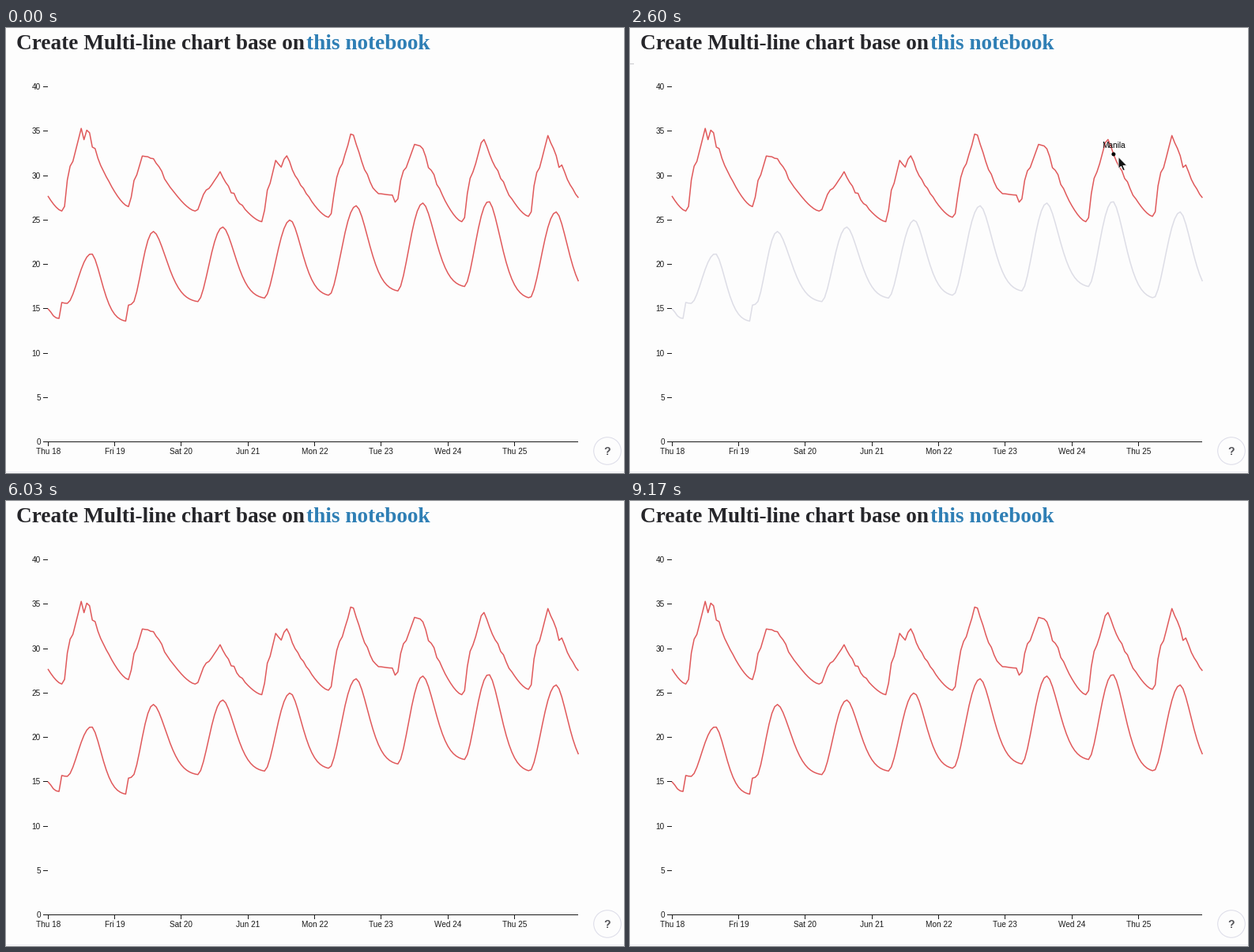
These frames come from a looping animation (782 px wide and 564 px high, 9.21 s). A matplotlib script:

```python
import numpy as np
import matplotlib.pyplot as plt
from matplotlib import patheffects
from matplotlib.animation import FuncAnimation
from matplotlib.patches import Circle, Polygon

W, H, DPI = 782, 564, 64
PT = 72 / DPI
FRAMES, STEP = 307, 30
LAG = 120  # ms the marker trails the pointer

PAPER, INK, LINK = "#fdfdfd", "#26262a", "#2f7fb5"
LINE, FADED, TEXT = "#e0585a", "#dddde6", "#1a1a1a"

# (hour, temperature) at the daily turns
MANILA = [(0, 27.7), (5, 26), (12, 35.3), (13, 34), (14, 35.3), (29, 26.5),
          (34, 32.2), (38, 32), (53, 26), (62, 30.3), (77, 24.8), (82, 31.7),
          (84, 31), (86, 32.3), (101, 25.3), (109.5, 35.1), (119, 28),
          (124, 27.8), (125, 27), (132, 33.5), (135, 33.2), (149, 24.8),
          (156.6, 34.4), (173, 25.4), (180, 34.5), (196, 26)]
ONTARIO = [(0, 15), (4, 13.9), (5, 15.7), (7, 15.6), (15.7, 21.2), (28, 13.6),
           (29, 15.4), (30.3, 15.5), (38, 23.7), (54, 15.8), (63, 24.2),
           (78, 16.2), (87.3, 25), (101.3, 16.5), (111, 26.6), (126, 17),
           (135, 26.9), (150, 17.5), (158.7, 27.1), (173.5, 16.2), (183, 25.9),
           (197, 16.3)]
# pointer visits: (ms, x, y) where the hand slows down
VISITS = [
    [(1250, 786, 90), (1700, 677, 181), (1830, 675, 177), (2500, 620, 160),
     (3110, 574, 241), (3230, 568, 225), (3800, 515, 175), (4350, 488, 209),
     (4470, 486, 187), (5800, 786, 180)],
    [(6400, 786, 190), (6900, 640, 280), (7850, 502, 316), (7970, 501, 318),
     (8800, 0, 300)],
]


def ease(s):
    return (1 - np.cos(np.pi * s)) / 2


def morning(s):
    """Quick jump after sunrise, short rest, then a climb to noon."""
    return np.interp(s, [0, .14, .28, .42, .57, 1], [0, .05, .37, .54, .6, 1])


def evening(s):
    return 1 - (1 - s) ** 1.5


def swell(s):
    return ease(s ** .86)


def ebb(s):
    return (1 - np.exp(-(s / .432) ** 1.72)) / .985


def trace(x, knots, rise, fall):
    """Join the knots with one shape for rising and one for falling spans."""
    kx, ky = np.array(knots, float).T
    x = np.clip(x, kx[0], kx[-1])
    i = np.clip(np.searchsorted(kx, x, side="right") - 1, 0, len(kx) - 2)
    s = (x - kx[i]) / (kx[i + 1] - kx[i])
    dy = ky[i + 1] - ky[i]
    return ky[i] + dy * np.where(dy > 0, rise(s), fall(s))


def px(hour):
    return 53 + hour * 3.515


def py(temp):
    return 524.5 - temp * 11.25


hours = np.arange(192)
gusts = np.random.default_rng(4).normal(0, .22, 192)
gusts *= np.exp(-((hours % 24 - 17) / 4) ** 2)
upper = trace(hours, MANILA, morning, evening) + gusts
lower = trace(hours, ONTARIO, swell, ebb)
SERIES = {"Manila": np.column_stack([px(hours), py(upper)]),
          "Ontario": np.column_stack([px(hours), py(lower)])}

fig = plt.figure(figsize=(W / DPI, H / DPI), dpi=DPI, facecolor=PAPER)
ax = fig.add_axes([0, 0, 1, 1])
ax.set(xlim=(0, W), ylim=(H, 0))
ax.axis("off")


def stroke(xs, ys, color=TEXT, width=1.0, z=2):
    return ax.plot(xs, ys, color=color, lw=width * PT, zorder=z, snap=False,
                   solid_capstyle="butt", solid_joinstyle="round")[0]


def write(x, y, s, size=10, color=TEXT, font="Liberation Sans", **kw):
    return ax.text(x, y, s, fontsize=size * PT, color=color, family=font,
                   va="baseline", **kw)


for x, s, color in ((13, "Create Multi-line chart base on", INK),
                    (380, "this notebook", LINK)):
    write(x, 27, s, 27.2, color, "Liberation Serif", weight="bold")

for temp in range(0, 41, 5):
    y = np.floor(py(temp)) + 0.5
    stroke([47, 53], [y, y])
    write(44, y + 3.5, str(temp), ha="right")

stroke([53, 724], [524.5, 524.5])
days = ["Thu 18", "Fri 19", "Sat 20", "Jun 21", "Mon 22", "Tue 23", "Wed 24", "Thu 25"]
for i, day in enumerate(days):
    x = np.floor(px(24 * i)) + 0.5
    stroke([x, x], [524, 530])
    write(x, 540, day, ha="center")

stroke([0, W], [562.5, 562.5], "#eeeef3")
ax.add_patch(Circle((761, 536), 17.3, fc=PAPER, ec="#dcdce8", lw=PT, zorder=3))
write(761, 541, "?", 14, "#55555a", weight="bold", ha="center")

curves = {name: stroke(*pts.T, LINE, 1.5, 3) for name, pts in SERIES.items()}
edge = stroke([0, 5], [45.5, 45.5], "#c8c8cc")
dot = ax.add_patch(Circle((0, 0), 2.5, color="black", lw=0, zorder=6))
label = write(0, 0, "", color="black", ha="center", zorder=7)

ARROW = np.array([(0, 0), (0, 15), (3.4, 11.8), (5.8, 17.4), (8.2, 16.4),
                  (5.8, 11), (10.6, 10.8)])
BEAM = np.array([(-3, -7), (0, -6), (3, -7), (0, -6), (0, 6), (3, 7), (0, 6), (-3, 7)])
arrow = ax.add_patch(Polygon(ARROW, fc="#141414", ec="white", lw=0.8 * PT, zorder=8))
beam = stroke(*BEAM.T, "#333333", 1, 8)
beam.set_path_effects([patheffects.withStroke(linewidth=3 * PT, foreground="white")])
hover_parts = (edge, dot, label, arrow, beam)


def pointer(visit, t):
    return np.array([trace(t, [(k[0], k[axis]) for k in visit], ease, ease)
                     for axis in (1, 2)])


def update(frame):
    t = frame * STEP
    visit = next((v for v in VISITS if v[0][0] <= t < v[-1][0]), None)
    for part in hover_parts:
        part.set_visible(visit is not None)
    if visit is None:
        for curve in curves.values():
            curve.set(color=LINE, zorder=3)
        return

    probe = pointer(visit, t - LAG)
    gaps = {n: np.hypot(*(p - probe).T) for n, p in SERIES.items()}
    name = min(gaps, key=lambda n: gaps[n].min())
    x, y = SERIES[name][gaps[name].argmin()]
    for n, curve in curves.items():
        curve.set(color=LINE if n == name else FADED, zorder=4 if n == name else 3)
    dot.center = x, y
    label.set(text=name, x=x, y=y - 8)

    pos = pointer(visit, t)
    on_label = abs(pos[0] - x) < 17 and abs(pos[1] - (y - 11)) < 8
    arrow.set_visible(not on_label)
    beam.set_visible(on_label)
    arrow.set_xy(ARROW + pos)
    beam.set_data(*(BEAM + pos).T)


anim = FuncAnimation(fig, update, frames=FRAMES, interval=STEP,
                     init_func=lambda: update(0), repeat=True, repeat_delay=0,
                     cache_frame_data=False)
plt.show()
```
